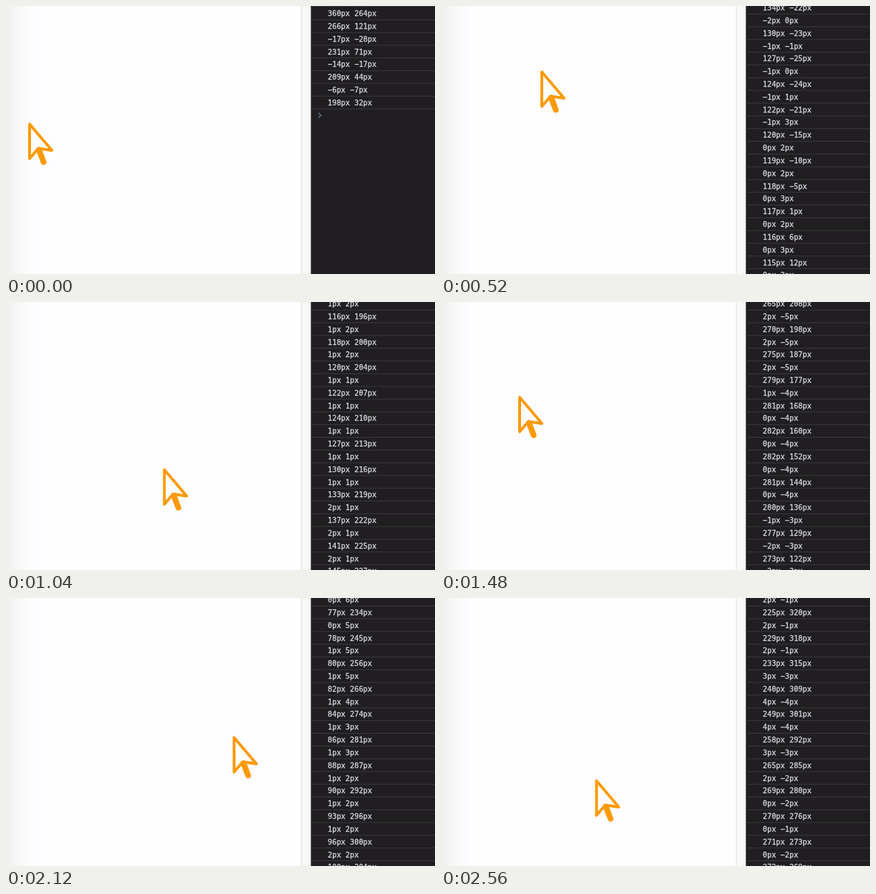
Animation of 600 by 375 pixels, one loop 2600 ms. Source, as an HTML page with a canvas:

```html
<!DOCTYPE html>
<html lang="en">
<head>
<meta charset="utf-8">
<title>Pointer log</title>
<style>
  html, body { margin: 0; width: 100%; height: 100%; overflow: hidden; background: #fefdff; }
  canvas { display: block; width: 600px; height: 375px; }
</style>
</head>
<body>
<canvas id="stage" width="600" height="375"></canvas>
<script>
const ctx = document.getElementById('stage').getContext('2d');
const STEP_MS = 40, STEPS = 65;
const PITCH = 17.82, VISIBLE = 21;
const PANEL_X = 426.4, TEXT_X = 450;
const PAPER = '#fefdff', ORANGE = '#fc9a06', INK = '#d4d8dd';

// Pointer tip and newest console row at a few ticks: [tick, x, y, row]
const poses = [
  [0, 33, 164, 7], [13, 141, 91, 70], [26, 221.5, 233.5, 131], [37, 110, 132, 186],
  [46, 16, -1, 227], [53, 319, 194, 261], [64, 217.5, 254.5, 313]
];

// Bends of the logged path: [sample index, x, y]
const bends = [
  [3, 198, 32],
  [24, 134, -22], [27, 124, -24], [30, 119, -10], [34, 115, 12],
  [55, 116, 196], [60, 127, 213], [65, 145, 227],
  [82, 265, 208], [85, 279, 177], [88, 282, 152], [92, 273, 122],
  [103, 156, 99], [108, 126, 110], [113, 102, 134],
  [120, 77, 234], [123, 82, 266], [130, 100, 304],
  [146, 225, 320], [148, 233, 315], [152, 265, 285], [156, 272, 269]
];

const opening = ['360px 264px', '266px 121px', '-17px -28px', '231px 71px',
  '-14px -17px', '209px 44px', '-6px -7px', '198px 32px'];

function slope(keys, i, c) {
  const rate = j => (keys[j + 1][c] - keys[j][c]) / (keys[j + 1][0] - keys[j][0]);
  if (i === 0) return rate(0);
  if (i === keys.length - 1) return rate(i - 1);
  const before = keys[i][0] - keys[i - 1][0], after = keys[i + 1][0] - keys[i][0];
  return (rate(i - 1) * after + rate(i) * before) / (before + after);
}

function segment(keys, t) {
  let i = 0;
  while (i < keys.length - 2 && keys[i + 1][0] <= t) i++;
  const h = keys[i + 1][0] - keys[i][0];
  return { i, h, u: Math.min(1, Math.max(0, (t - keys[i][0]) / h)) };
}

// Cubic Hermite through unevenly spaced keys
function curve(keys, t, c) {
  const { i, h, u } = segment(keys, t);
  const a = keys[i][c], b = keys[i + 1][c], w = 1 - u;
  return a * (1 + 2 * u) * w * w + b * u * u * (3 - 2 * u)
    + h * u * w * (w * slope(keys, i, c) - u * slope(keys, i + 1, c));
}

function linear(keys, t, c) {
  const { i, u } = segment(keys, t);
  return keys[i][c] + (keys[i + 1][c] - keys[i][c]) * u;
}

const sample = (n, c) => Math.round(curve(bends, n, c));
const movement = (n, c) => Math.trunc((sample(n, c) - sample(n - 1, c)) / 2);

// Rows alternate between a movement and the position it leads to
function rowText(row) {
  if (row < opening.length) return opening[row];
  const read = row % 2 ? sample : movement;
  const n = Math.floor(row / 2);
  return `${read(n, 1)}px ${read(n, 2)}px`;
}

function drawPage() {
  ctx.fillStyle = PAPER;
  ctx.fillRect(0, 0, 600, 375);
  const shade = ctx.createLinearGradient(0, 0, 40, 0);
  shade.addColorStop(0, '#efeeef');
  shade.addColorStop(0.4, '#f8f7f8');
  shade.addColorStop(1, PAPER);
  ctx.fillStyle = shade;
  ctx.fillRect(0, 0, 40, 375);
  ctx.fillStyle = '#f9f8f9';
  ctx.fillRect(413, 0, 14, 375);
  ctx.fillStyle = '#dfdedf';
  ctx.fillRect(412.6, 0, 1, 375);
}

function polyline(points) {
  ctx.beginPath();
  points.forEach(([x, y]) => ctx.lineTo(x, y));
}

function drawPointer(x, y) {
  ctx.save();
  ctx.translate(x, y);
  ctx.strokeStyle = ORANGE;
  ctx.fillStyle = PAPER;
  ctx.lineJoin = ctx.lineCap = 'round';
  ctx.lineWidth = 3.9;
  polyline([[0, 1.2], [31.2, 38], [12.2, 35.2], [0, 49.6]]);
  ctx.closePath();
  ctx.fill();
  ctx.stroke();
  ctx.lineWidth = 8;
  polyline([[13.2, 37.5], [19.6, 54.3]]);
  ctx.stroke();
  ctx.restore();
}

function drawConsole(last) {
  ctx.fillStyle = '#201e20';
  ctx.fillRect(PANEL_X, 0, 600 - PANEL_X, 375);
  const scrolled = last >= VISIBLE;
  const first = scrolled ? last - VISIBLE : 0;
  const top = scrolled ? 2.3 : 10.4;
  ctx.font = '10.3px "DejaVu Sans Mono", monospace';
  ctx.lineWidth = 0.3;
  ctx.strokeStyle = INK;
  for (let row = first; row <= last; row++) {
    const y = top + (row - first) * PITCH;
    const text = rowText(row).replace(/-/g, '\u2212');
    ctx.fillStyle = '#3b393b';
    ctx.fillRect(PANEL_X, y + 8.4, 600 - PANEL_X, 1);
    if (row === 0) ctx.fillRect(PANEL_X, 0, 600 - PANEL_X, 1);
    ctx.fillStyle = INK;
    ctx.fillText(text, TEXT_X, y + 3.8);
    ctx.strokeText(text, TEXT_X, y + 3.8);
  }
  if (scrolled) return;
  const y = top + (last + 1) * PITCH;
  ctx.strokeStyle = '#526578';
  ctx.lineWidth = 1.8;
  polyline([[437, y - 3.3], [440.6, y], [437, y + 3.3]]);
  ctx.stroke();
}

function draw(now) {
  const tick = Math.floor(now / STEP_MS) % STEPS;
  drawPage();
  drawPointer(curve(poses, tick, 1), curve(poses, tick, 2));
  drawConsole(Math.floor(linear(poses, tick, 3) + 1e-6));
}

let start;
function loop(now) {
  start ??= now;
  draw(Math.max(0, now - start));
  requestAnimationFrame(loop);
}
draw(0);
requestAnimationFrame(loop);
</script>
</body>
</html>
```
